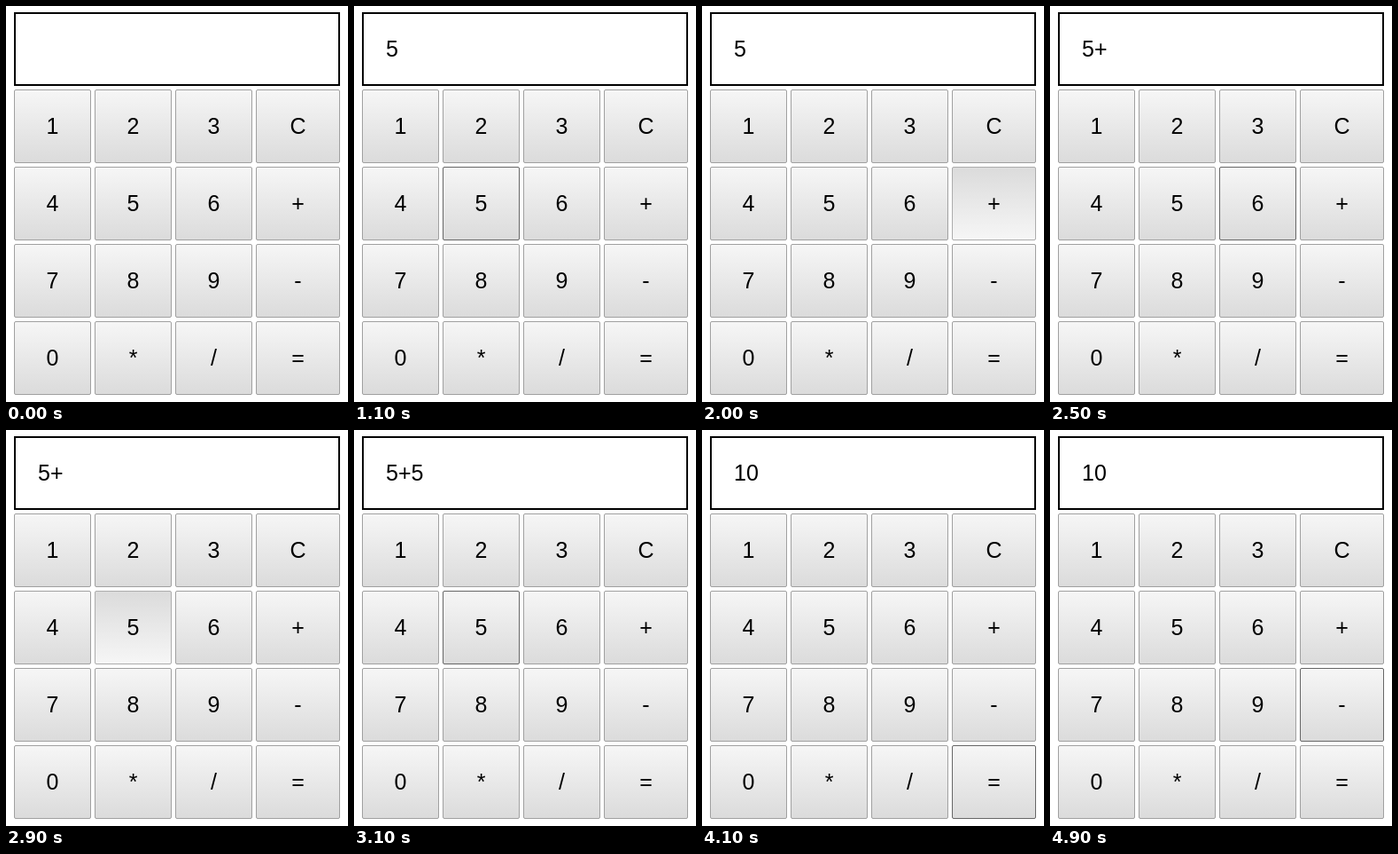
An HTML page for the animation above (5000 ms loop, 386 by 446 pixels).

```html
<!DOCTYPE html>
<html lang="en">
<head>
<meta charset="utf-8">
<title>Calculator</title>
<style>
html, body { margin: 0; width: 100%; height: 100%; overflow: hidden; background: #fff; }
svg { display: block; }
text { font: 25px "Liberation Sans", Arial, sans-serif; fill: #000; }
.key rect { fill: url(#up); stroke: #a0a0a0; }
.key text { text-anchor: middle; }
.hover rect { stroke: #666; }
.down rect { fill: url(#down); stroke: #acacac; }
</style>
</head>
<body>
<svg id="stage" width="386" height="446" viewBox="0 0 386 446">
  <defs>
    <linearGradient id="up" x1="0" y1="0" x2="0" y2="1">
      <stop offset="0" stop-color="#f6f6f6"/><stop offset="1" stop-color="#dbdbdb"/>
    </linearGradient>
    <linearGradient id="down" x1="0" y1="0" x2="0" y2="1">
      <stop offset="0" stop-color="#dbdbdb"/><stop offset="1" stop-color="#f6f6f6"/>
    </linearGradient>
  </defs>
  <rect x="10" y="8" width="366" height="81" fill="#fff" stroke="#000" stroke-width="2"/>
  <text id="display" x="36" y="57"></text>
</svg>
<script>
const LOOP = 5000;
const stage = document.getElementById("stage");
const display = document.getElementById("display");
const keys = {};

function add(parent, tag, attrs) {
  const el = document.createElementNS("http://www.w3.org/2000/svg", tag);
  for (const name in attrs) el.setAttribute(name, attrs[name]);
  return parent.appendChild(el);
}

[..."123C456+789-0*/="].forEach((label, i) => {
  const col = i % 4, row = Math.floor(i / 4);
  const x = 9 + col * 91, y = 94 + row * 87, w = col === 3 ? 95 : 87;
  const key = add(stage, "g", { class: "key" });
  add(key, "rect", { x: x + 0.5, y: y + 0.5, width: w - 1, height: 82, rx: 1.5 });
  add(key, "text", { x: x + w / 2, y: y + 50 }).textContent = label;
  keys[label] = key;
});

// Each track is a list of [start in ms, value]
const pointer = [[0, ""], [400, "*"], [500, "8"], [600, "5"], [1600, "6"], [1700, "+"],
  [2500, "6"], [2600, "5"], [3600, "="], [4800, "-"]];
const pressed = [[0, false], [1900, true], [2100, false], [2900, true], [3100, false]];
const shown = [[0, ""], [1100, "5"], [2100, "5+"], [3100, "5+5"], [4000, "10"]];

function valueAt(track, t) {
  let value;
  for (const [start, v] of track) if (t >= start) value = v;
  return value;
}

function draw(t) {
  const over = valueAt(pointer, t);
  const state = valueAt(pressed, t) ? "key down" : "key hover";
  for (const label in keys) {
    keys[label].setAttribute("class", label === over ? state : "key");
  }
  display.textContent = valueAt(shown, t);
}

let origin;
function tick(now) {
  origin ??= now;
  draw((now - origin) % LOOP);
  requestAnimationFrame(tick);
}
draw(0);
requestAnimationFrame(tick);
</script>
</body>
</html>
```
